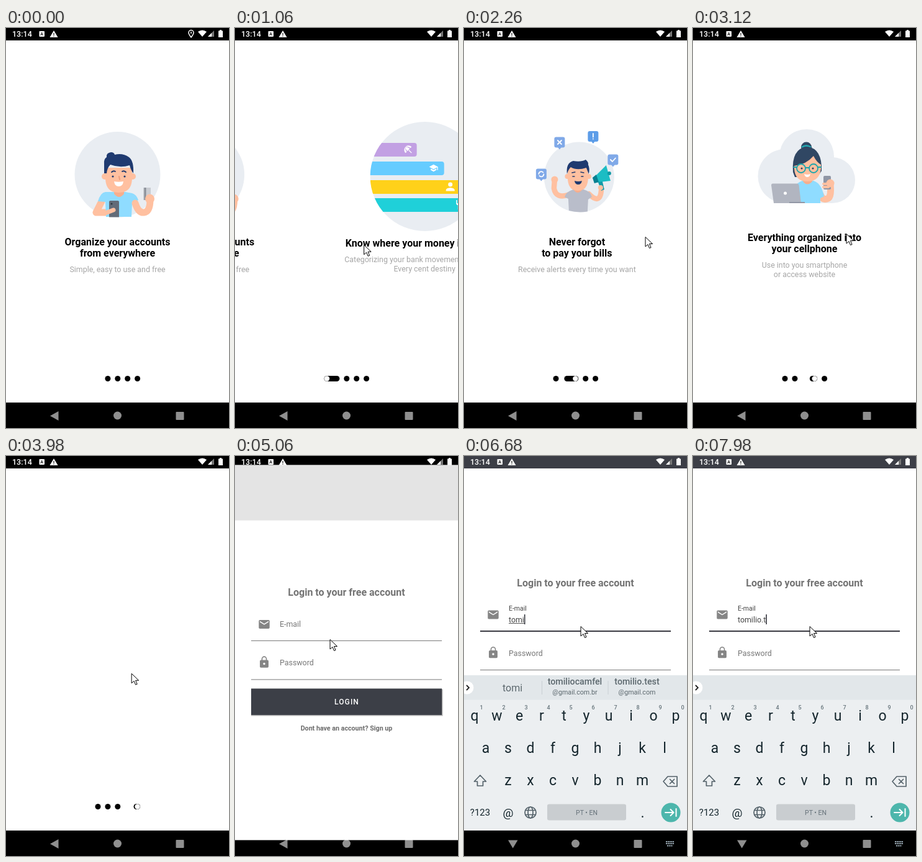
Recreate the animation shown at these times as an HTML page. Size 359 by 644 pixels, loop 8 s.

```html
<!DOCTYPE html>
<html lang="en">
<head>
<meta charset="utf-8">
<title>Onboarding and login</title>
<style>
html, body { margin: 0; width: 100%; height: 100%; overflow: hidden; background: #000; }
svg { display: block; font-family: Roboto, sans-serif; }
.mid, .title, .sub, .key { text-anchor: middle; }
.title { font-size: 16px; font-weight: 700; }
.sub { font-size: 12.4px; fill: #a6a6a6; }
.field { font-size: 12.4px; fill: #777; }
.key { font-size: 23px; fill: #15262d; }
.hint { font-size: 9px; fill: #66747b; font-weight: 500; text-anchor: middle; }
.skin { fill: #ffc0a0; }
.limb { fill: none; stroke: #ffc0a0; stroke-linecap: round; stroke-linejoin: round; }
.pale { fill: #e9edf2; }
.navy { fill: #1f3a70; }
.shirt { fill: #8fdcff; }
.line { fill: none; stroke-linecap: round; stroke-linejoin: round; }
</style>
</head>
<body>
<svg width="359" height="644" viewBox="0 0 359 644">
<defs>
  <clipPath id="discClip"><circle cx="180" cy="239" r="88"/></clipPath>
  <clipPath id="manClip"><path d="M110 160H260V304.500H110Z"/></clipPath>
  <clipPath id="loginClip"><rect id="reveal" width="359" height="644"/></clipPath>
  <clipPath id="bodyClip"><rect width="359" height="603"/></clipPath>
  <g id="bubble"><rect x="-8.500" y="-8.500" width="17" height="17" rx="3"/><path d="M-3 8H3L0 11.500Z"/></g>
  <g id="status" fill="#fff">
    <text x="10" y="14" font-size="12.500" font-weight="500">13:14</text>
    <rect x="53.500" y="5" width="8.500" height="9" rx="1"/>
    <text x="57.700" y="12" font-size="7" font-weight="700" class="mid" fill="#222">A</text>
    <path d="M77 4L83.500 15H70.500Z"/><path d="M77 8V11.500M77 12.500V13.700" stroke="#222" stroke-width="1.300"/>
    <path d="M309 6Q316 1 323 6L316 14Z"/>
    <path d="M335 4V14H325Z" fill="#777"/><path d="M331 8V14H325Z"/>
    <path d="M342 4.500H344V3H347V4.500H349V15H342Z"/>
  </g>
</defs>

<rect width="359" height="644"/>
<use href="#status"/>
<path id="pin" d="M298 15Q294 10 294 7.500A4 4 0 0 1 302 7.500Q302 10 298 15ZM298 6V9" fill="none" stroke="#fff" stroke-width="1.500"/>
<g fill="#8f8f8f">
  <path id="back"/>
  <circle cx="179.500" cy="624" r="6.500"/><rect x="273.500" y="618" width="13" height="13" rx="1"/>
  <path id="imeSwitch" d="M325 621H338M325 624H338M327 627.500H336" stroke="#9fb0bb" stroke-width="1.800" stroke-dasharray="2 .8"/>
</g>

<g id="intro">
  <rect y="20" width="359" height="583" fill="#fff"/>
  <g id="pages">
    <g>
      <circle cx="179.500" cy="236" r="69" class="pale"/>
      <g clip-path="url(#manClip)">
        <path d="M154 279L145 297H170" class="limb" stroke-width="11"/>
        <path d="M171 264H192L203 266Q210 268 213 277L203 283L202 304H161L160 280L148 279Q152 265 160 264Z" class="shirt"/>
        <path d="M208 282Q213 298 222 297Q232 296 232 276" class="limb" stroke-width="11"/>
        <rect x="221" y="257" width="12" height="20" fill="#c9ccd2"/><path d="M224 257V277" stroke="#8a8f98" stroke-width="3"/>
        <circle cx="231.500" cy="275" r="7.500" class="skin"/>
        <rect x="166" y="278" width="16" height="28" rx="2" fill="#626b78"/><circle cx="170" cy="283" r="1.500" fill="#2f3640"/>
        <path d="M160 298L173 293" class="limb" stroke-width="7"/>
      </g>
      <path d="M174 258H190V267Q182 277 174 267Z" fill="#f7ae8d"/>
      <circle cx="159" cy="239" r="5" class="skin"/><circle cx="204" cy="239" r="5" class="skin"/>
      <path d="M160 225H203V241Q203 265 181.500 265Q160 265 160 241Z" class="skin"/>
      <path d="M158 234V219Q157 211 162 208Q161 201 169 200Q174 200 175 204Q188 201 198 208Q206 214 205 234Q201 229 199 221Q184 226 168 220Q163 225 162 234Z" class="navy"/>
      <path d="M170 232Q173 229 176 231M187 231Q190 229 193 232" class="line" stroke="#1f3a70" stroke-width="1.800"/>
      <circle cx="172" cy="239" r="1.600" class="navy"/><circle cx="191" cy="239" r="1.600" class="navy"/>
      <path d="M182 239L183 244" class="line" stroke="#ee9e7d" stroke-width="2"/>
      <path d="M174 247Q181 248.500 189 247Q188 255 181.500 255Q175 255 174 247Z" fill="#fff"/>
      <text x="179.500" y="349.500" class="title">Organize your accounts</text>
      <text x="179.500" y="368" class="title">from everywhere</text>
      <text x="179.500" y="393" class="sub">Simple, easy to use and free</text>
    </g>
    <g>
      <circle cx="180" cy="239" r="88" class="pale"/>
      <g id="bars" clip-path="url(#discClip)"></g>
      <text x="179.500" y="351.500" class="title">Know where your money is going to</text>
      <text x="179.500" y="377" class="sub">Categorizing your bank movements and seeing</text>
      <text x="179.500" y="391.500" class="sub">Every cent destiny</text>
    </g>
    <g>
      <g transform="translate(-2.500)">
        <circle cx="185.500" cy="240" r="56.500" class="pale"/>
        <g fill="#80a9e8">
          <use href="#bubble" x="154" y="184"/><use href="#bubble" x="208" y="174.500" fill="#5d9de8"/>
          <use href="#bubble" x="240" y="212"/><use href="#bubble" x="124.500" y="235"/>
        </g>
        <path d="M151 181L157 187M157 181L151 187M208 170V175.500M208 178.500V178.600M236 212L239 215L244 209.500M120.500 235A4 4 0 0 1 127.500 232.500M128.500 235.500A4 4 0 0 1 121.500 238" class="line" stroke="#fff" stroke-width="1.800"/>
        <path d="M170 268Q148 276 145 258L146 245" class="limb" stroke-width="8.500"/><circle cx="146" cy="244" r="5.500" class="skin"/>
        <path d="M201 267Q219 285 221 262" class="limb" stroke-width="8.500"/>
        <path d="M176 260H193Q204 263 206 272L200 276L199 295.500Q184 298 169 294L168 275L162 272Q165 263 176 260Z" fill="#b9bdca"/>
        <path d="M208 242L229 221L236 246L211 249Z" fill="#1cbdc4"/><path d="M216 248L221 262L226 260L223 247Z" fill="#129ba8"/>
        <path d="M207 241L213 236L217 248L210 250Z" fill="#087f91"/><circle cx="234" cy="234" r="3" fill="#0d9aa5"/>
        <circle cx="220" cy="257" r="4" class="skin"/>
        <path d="M177 255H190V261Q183 269 177 261Z" fill="#f7ae8d"/>
        <circle cx="166.500" cy="239" r="4" class="skin"/><circle cx="201" cy="239" r="4" class="skin"/>
        <path d="M167 224H200V240Q200 262 183.500 262Q167 262 167 240Z" class="skin"/>
        <path d="M166 235Q164 217 176 214Q189 216 196 212Q201 216 200 220Q203 226 201 235L197 225Q182 230 172 224Q168 228 166 235Z" class="navy"/>
        <path d="M174 233L179 232M188 232L193 233M175 239H178M189 239H192" class="line" stroke="#1f3a70" stroke-width="1.500"/>
        <path d="M178 246Q184 248 190 246Q189 252 184 252Q179 252 178 246Z" class="navy"/>
      </g>
      <text x="179.500" y="349.500" class="title">Never forgot</text>
      <text x="179.500" y="368" class="title">to pay your bills</text>
      <text x="179.500" y="393" class="sub">Receive alerts every time you want</text>
    </g>
    <g>
      <g class="pale">
        <circle cx="148" cy="238.500" r="43.500"/><circle cx="183" cy="207" r="44"/><circle cx="224" cy="245" r="37"/><path d="M147 230H224V282H147Z"/>
      </g>
      <circle cx="182.500" cy="192" r="8.500" fill="#304763"/><path d="M175 192Q182 187 190 192" fill="none" stroke="#21aeb5" stroke-width="2.500"/>
      <path d="M161 232Q158 194 184 191Q208 194 207 230L200 240H164Z" fill="#304763"/>
      <path d="M205 268Q209 279 218 274Q223 270 221 252" class="limb" stroke-width="11"/>
      <path d="M176 246H194Q207 250 211 271L205 274V282H165V256Q168 248 176 246Z" class="shirt"/>
      <path d="M177 240H192V247Q184 256 177 247Z" fill="#f7ae8d"/>
      <path d="M163 222Q182 220 194 206Q199 216 206 220V226Q204 247 184 247Q164 247 163 226Z" class="skin"/>
      <g class="line" stroke="#1ba6ac" stroke-width="1.800"><circle cx="174" cy="226" r="7"/><circle cx="194" cy="226" r="7"/><path d="M181 225H187M162 224H167M201 224H206"/></g>
      <circle cx="175" cy="226" r="1.600" fill="#304763"/><circle cx="193" cy="226" r="1.600" fill="#304763"/>
      <path d="M179 235Q184 237 189 235Q188 240 184 240Q180 240 179 235Z" fill="#fff"/>
      <rect x="210" y="238" width="12" height="22" rx="2" fill="#8f96a5"/><circle cx="221" cy="250" r="6.500" class="skin"/><path d="M210 251H218M210 256H218" class="limb" stroke-width="4"/>
      <path d="M128 250.500H168Q170 250.500 170.500 253L174 282H130L126 253Q126 250.500 128 250.500Z" fill="#b1b5c0"/><path d="M155 280H180V282H155Z" fill="#9297a5"/>
      <circle cx="148.500" cy="266" r="2.500" fill="#fff"/>
      <text x="179.500" y="342.500" class="title">Everything organized into</text>
      <text x="179.500" y="361" class="title">your cellphone</text>
      <text x="179.500" y="386" class="sub">Use into you smartphone</text>
      <text x="179.500" y="400.500" class="sub">or access website</text>
    </g>
  </g>
  <g id="dots"></g>
</g>
<rect id="dim" width="359" height="603"/>

<g clip-path="url(#loginClip)"><g id="login">
  <rect width="359" height="20" fill="#3c3e46"/><use href="#status"/>
  <rect y="20" width="359" height="583" fill="#fff"/>
  <text x="179.500" y="209.500" class="title" fill="#737373">Login to your free account</text>
  <g id="fieldIcons" fill="#858585"></g>
  <text id="label" x="72" class="field">E-mail</text>
  <text x="72" y="321.500" class="field">Password</text>
  <path id="emailLine" d="M26 282H333"/><path d="M26 344.500H333" stroke="#777"/>
  <path d="M26 402H333.500V360" fill="none" stroke="#b5b5b5" stroke-width="2"/>
  <rect x="26" y="359" width="307" height="42.500" fill="#3c3f47"/>
  <text x="180" y="385" class="mid" font-size="12" font-weight="500" letter-spacing="1.100" fill="#fff">LOGIN</text>
  <text x="179.500" y="427" class="mid" font-size="10.700" font-weight="700" fill="#6b6b6b">Dont have an account? Sign up</text>
  <text id="typed" x="72" y="267.500" class="field" style="fill:#444"></text>
  <path id="underline" stroke="#555"/><rect id="caret" y="255" width="1.600" height="16" fill="#33353d"/>
</g></g>

<g clip-path="url(#bodyClip)"><g id="keyboard">
  <rect y="353" width="359" height="250" fill="#eceff1"/><rect y="353" width="359" height="39.500" fill="#e2e7ea"/>
  <circle cx="5" cy="373" r="10.500" fill="#fff"/><path d="M4 369L8 373L4 377" fill="none" stroke="#222" stroke-width="1.800"/>
  <g id="suggestions" class="mid" fill="#5c686e">
    <text id="draft" x="78" y="379" font-size="16"></text>
    <g font-size="14.200" font-weight="500"><text x="178.500" y="368">tomiliocamfel</text><text x="278.500" y="368">tomilio.test</text></g>
    <g font-size="10.700"><text x="178.500" y="384">@gmail.com.br</text><text x="278.500" y="384">@gmail.com</text></g>
    <path d="M125.500 362V384M232 362V384" stroke="#c9d0d4"/>
  </g>
  <g id="keys"></g>
  <g class="line" stroke="#54626a" stroke-width="1.700">
    <path d="M26 514L35.500 524H30.500V531H21.500V524H16.500Z"/>
    <path d="M328 516H343V532H328L321 524ZM331.500 520.500L338.500 527.500M338.500 520.500L331.500 527.500"/>
    <circle cx="107" cy="574" r="9"/><ellipse cx="107" cy="574" rx="4" ry="9"/><path d="M99 570.500H115M99 577.500H115"/>
  </g>
  <rect x="134" y="560.500" width="127" height="26" rx="3" fill="#c9cdd0"/>
  <text x="197.500" y="578" class="mid" font-size="10.500" fill="#66727a">PT • EN</text>
  <circle cx="333" cy="574" r="15.500" fill="#4db6ac"/>
  <path d="M324 574H337M332.500 569L337.500 574L332.500 579M341.500 568V580" class="line" stroke="#fff" stroke-width="2"/>
</g></g>
<path id="cursor" d="M0 .5V16L4 12.500L6.500 18.500L9 17.500L6.500 11.500H11.500Z" fill="#fff" stroke="#000"/>
</svg>

<script>
const $ = id => document.getElementById(id);
const set = (id, attrs) => { for (const k in attrs) $(id).setAttribute(k, attrs[k]); };
const show = (id, on) => set(id, { visibility: on ? 'visible' : 'hidden' });
const lerp = (a, b, u) => a + (b - a) * u;
const ramp = (t, a, b) => Math.min(1, Math.max(0, (t - a) / (b - a)));
const icon = (d, x, y, s, fill) =>
  `<path fill="${fill}" transform="translate(${x - 12 * s} ${y - 12 * s}) scale(${s})" d="${d}"/>`;

// Icons on a 24 unit grid
const UMBRELLA = 'M13.1 14.6l1.4-1.4 6.5 6.400L19.600 21zM17.400 8.800l2.900-2.800C16.300 2 9.900 2 6 5.900c3.900-1.300 8.300-.2 11.400 2.900zM6 6C2 9.900 2 16.300 6 20.300l2.800-2.900C5.700 14.300 4.700 9.900 6 6zM6 6c-.4 3 1.200 6.900 4.300 10L16 10.300C12.900 7.100 9 5.600 6 6z';
const SCHOOL = 'M5 13.200v4L12 21l7-3.800v-4L12 17zM12 3L1 9l11 6 9-4.900V17h2V9z';
const PERSON = 'M12 12a4 4 0 1 0 0-8 4 4 0 0 0 0 8zm0 2c-2.700 0-8 1.300-8 4v2h16v-2c0-2.700-5.300-4-8-4z';
const FOOD = 'M11 9H9V2H7v7H5V2H3v7c0 2.100 1.700 3.800 3.800 4v9h2.500v-9C11.300 12.800 13 11.100 13 9V2h-2zm5-3v8h2.500v8H21V2c-2.800 0-5 2.200-5 4z';
const MAIL = 'M20 4H4a2 2 0 0 0-2 2v12c0 1.100.9 2 2 2h16a2 2 0 0 0 2-2V6a2 2 0 0 0-2-2zm0 4l-8 5-8-5V6l8 5 8-5z';
const LOCK = 'M18 8h-1V6A5 5 0 0 0 7 6v2H6a2 2 0 0 0-2 2v10c0 1.100.9 2 2 2h12a2 2 0 0 0 2-2V10a2 2 0 0 0-2-2zm-6 9a2 2 0 1 1 0-4 2 2 0 0 1 0 4zm3.100-9H8.900V6a3.100 3.100 0 0 1 6.200 0z';

$('bars').innerHTML = [
  [185, 167, '#c2a0e3', UMBRELLA, 153, 0.68],
  [215, 211, '#66ccff', SCHOOL, 194, 0.64],
  [245, 238, '#ffd11a', PERSON, 221, 0.87],
  [274, 255, '#1fd0d9', FOOD, 237, 0.74],
].map(([y, right, color, d, x, s]) =>
  `<rect x="80" y="${y}" width="${right - 80}" height="22" rx="4" fill="${color}"/>` +
  icon(d, x, y + 10.5, s, '#fff')).join('');
$('fieldIcons').innerHTML = icon(MAIL, 47, 255.5, 0.87, '#858585') + icon(LOCK, 47, 316.5, 0.87, '#858585');

const key = (c, x, y, size = 23) => `<text class="key" x="${x}" y="${y}" style="font-size:${size}px">${c}</text>`;
$('keys').innerHTML = [['qwertyuiop', 17], ['asdfghjkl', 35], ['zxcvbnm', 71]].map(([row, x0], r) =>
  [...row].map((c, i) => {
    const x = x0 + 36 * i;
    return key(c, x, 426 + 52 * r) +
      (r ? '' : `<text class="hint" x="${x + 11}" y="408">${(i + 1) % 10}</text>`);
  }).join('')).join('') +
  key('?123', 26, 579, 15) + key('@', 71, 581, 19) + key('.', 287.5, 582);

const pages = [...$('pages').children];
const swipes = [830, 1830, 2630, 3480];
const typing = [6360, 6470, 6570, 6680, 6900, 7010, 7110, 7330, 7980];
const NAME = 'tomilio.t';
const path = [
  [100, 232, 595], [530, 304, 345], [800, 304, 345], [1020, 205, 349], [1400, 286, 342],
  [1830, 286, 342], [2040, 205, 345], [2260, 292, 336], [2580, 298, 340], [2660, 298, 340],
  [2880, 190, 343], [3120, 247, 331], [3440, 292, 340], [3520, 292, 340], [3740, 195, 345],
  [4300, 213, 357], [4400, 213, 351], [4800, 213, 351], [5060, 153, 295], [5490, 188, 274], [8000, 188, 274],
];

const slide = s => { const u = ramp(s, 0, 460); return 1 - (1 - u ** 1.3) ** 2; };
const dotX = i => 148 + 15.9 * i;

function drawDots(t) {
  const R = 4.5;
  const pill = (a, b, r = R) => `<rect x="${a - r}" y="${564.5 - r}" width="${b - a + 2 * r}" height="${2 * r}" rx="${r}"/>`;
  let k = -1;
  swipes.forEach((start, i) => { if (t >= start) k = i; });
  const s = k < 0 ? 0 : t - swipes[k];
  let out = '';
  for (let i = 0; i < 5; i++) {
    if (i === k + 1) continue;
    const grow = i === k ? ramp(s, 640, 740) : 1;
    if (grow) out += pill(dotX(i), dotX(i), R * grow);
  }
  // The next dot stretches back, the white one travels, then the tail retracts
  if (k >= 0 && s < 510) {
    const from = dotX(k), to = dotX(k + 1);
    const tail = s < 420 ? lerp(to, from, ramp(slide(s), 0, 0.6)) : lerp(from, to, ramp(s, 420, 510));
    const white = lerp(from, to, 1 - (1 - ramp(s, 240, 450)) ** 1.5);
    out += pill(tail, to) + `<circle cx="${white}" cy="564.5" r="4.200" fill="#fff"/>`;
  }
  $('dots').innerHTML = out;
}

function drawCursor(t) {
  show('cursor', t >= 100);
  const i = Math.max(1, path.findIndex(p => p[0] > t));
  const [a, b] = [path[i - 1], path[i]];
  const u = ramp(t, a[0], b[0]), e = u * u * (3 - 2 * u);
  set('cursor', { transform: `translate(${lerp(a[1], b[1], e)} ${lerp(a[2], b[2], e)})` });
}

function drawLogin(t) {
  const u = ramp(t, 4900, 5380), e = 1 - (1 - u ** 1.5) ** 2.5;
  set('intro', { transform: `translate(0 ${-13.5 * e})` });
  set('dim', { opacity: Math.min(0.106, u), y: 20 - 13.5 * e });
  set('reveal', { y: 644 * (1 - u) ** 4.47 });
  set('login', { transform: `translate(0 ${26.500 * (1 - e)})` });

  const focused = t >= 5710, f = ramp(t, 5710, 5860);
  set('label', { y: lerp(259.5, 248.5, f), style: `font-size:${lerp(12.4, 10.5, f)}px;fill:${focused ? '#444' : '#777'}` });
  set('emailLine', { stroke: focused ? '#3a3a42' : '#777', 'stroke-width': focused ? 2 : 1 });

  const count = typing.filter(at => t >= at).length;
  const text = NAME.slice(0, count);
  $('typed').textContent = $('draft').textContent = text;
  const end = 72 + (count ? $('typed').getComputedTextLength() : 0);
  set('caret', { x: end });
  show('caret', focused && !(t >= 7870 && t < 7980));
  const composing = count > 0 && count < 8;
  show('suggestions', composing);
  set('underline', { d: composing ? `M72 269.500H${end}` : '' });

  const k = 1 - (1 - ramp(t, 5720, 6120)) ** 2;
  set('keyboard', { transform: `translate(0 ${250 * (1 - k)})` });
  show('keyboard', focused);
  const open = t >= 5900;
  set('back', { d: open ? 'M71 618.500H86.500L78.700 631.500Z' : 'M71 624.500L84.500 617V632Z' });
  show('imeSwitch', open);
}

function draw() {
  const t = performance.now() % 8000;
  show('pin', t < 100);
  const pos = swipes.reduce((sum, start) => sum + slide(t - start), 0);
  pages.forEach((page, i) => page.setAttribute('transform', `translate(${359 * (i - pos)} 0)`));
  drawDots(t);
  drawLogin(t);
  drawCursor(t);
  requestAnimationFrame(draw);
}
draw();
</script>
</body>
</html>
```
